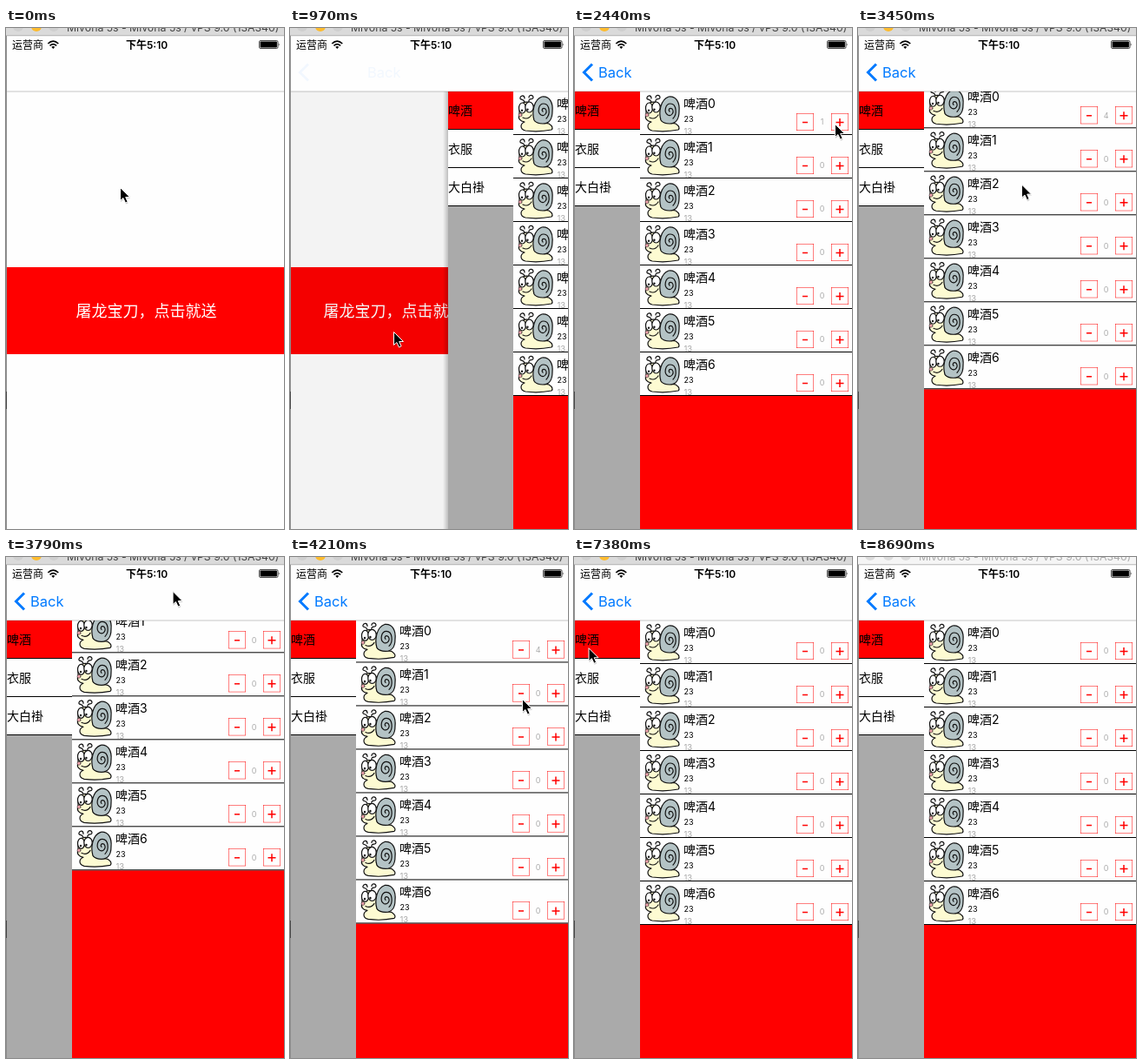
An HTML page that plays this animation: 320 px wide and 576 px high, repeating every 8.74 s.

```html
<!DOCTYPE html>
<html lang="zh-CN">
<head>
<meta charset="utf-8">
<title>Order list</title>
<style>
html, body { margin: 0; width: 100%; height: 100%; overflow: hidden; background: #fff; }
svg { display: block; width: 320px; height: 576px; }
text { font-family: Inter, "Noto Sans CJK SC", "Noto Sans CJK", sans-serif; white-space: pre; }
</style>
</head>
<body>
<svg viewBox="0 0 320 576" xmlns="http://www.w3.org/2000/svg">
  <defs>
    <linearGradient id="edge">
      <stop offset="0" stop-color="#000" stop-opacity="0"/>
      <stop offset="1" stop-color="#000" stop-opacity=".22"/>
    </linearGradient>
    <g id="snail" stroke="#111" stroke-width="1.2" stroke-linejoin="round" stroke-linecap="round">
      <path d="M9 8C8 4 3 6 4 3S9 0 9 4M14 8C13 3 19 6 19 3S14 -1 14 3" fill="none"/>
      <path d="M3 14C5 7 16 6 19 12C21 18 18 25 21 30C25 33 33 32 37 33Q43 37 40 40Q25 43 10 41C3 39 4 33 9 31C4 30 1 27 3 23Z" fill="#fdfbd2"/>
      <path d="M20 29C17 19 20 5 29 2C38 1 42 9 41 19C41 29 36 33 30 33Q23 33 20 29Z" fill="#b4c3c5"/>
      <path d="M30 19C28 17 30 14 33 16C36 20 32 25 28 23C23 20 25 10 31 10C38 10 39 22 34 27" fill="none"/>
      <ellipse cx="6.5" cy="15" rx="4" ry="6" fill="#fff"/>
      <ellipse cx="14.5" cy="14" rx="4.7" ry="6" fill="#fff"/>
      <path d="M6 17.5v.5M12.5 16.5v.5" stroke-width="2.2"/>
      <path d="M7 26Q13 29 17 23" fill="none"/>
      <circle cx="4" cy="23" r="2" fill="#f3a6b0" stroke-width=".5"/>
    </g>
  </defs>

  <rect width="320" height="576" fill="#fefefe"/>
  <g id="home">
    <rect x="1" y="275" width="420" height="100" fill="#f00"/>
    <text x="80.5" y="332" font-size="18" font-weight="300" fill="#fff">屠龙宝刀，点击就送</text>
  </g>
  <rect id="dim" y="73" width="320" height="503"/>

  <g id="page">
    <rect x="-5" y="73" width="6" height="503" fill="url(#edge)"/>
    <rect x="1" y="73" width="75" height="503" fill="#aaa"/>
    <g id="cats"></g>
    <rect x="76" y="73" width="245" height="503" fill="#f00"/>
    <g id="list"></g>
  </g>

  <rect x="1" y="9" width="319" height="64" fill="#fefefe"/>
  <rect x="1" y="72.5" width="319" height="1" opacity=".22"/>
  <g id="nav" fill="#007aff">
    <path d="M21 41.5L11.5 51L21 60.5" fill="none" stroke="#007aff" stroke-width="3"/>
    <text id="back" y="57" font-size="16.5">Back</text>
  </g>

  <text x="7" y="23.5" font-size="12">运营商</text>
  <path d="M48.3 18Q54.3 12.4 60.3 18M50.5 20.4Q54.3 17 58.1 20.4" fill="none" stroke="#000" stroke-width="1.7"/>
  <path d="M52.3 21.8Q54.3 20 56.3 21.8L54.3 24Z"/>
  <text x="138" y="23.5" font-size="12" font-weight="600">下午5:10</text>
  <rect x="291.5" y="14.5" width="21.5" height="9" rx="1.5" fill="none" stroke="#000" stroke-width=".7"/>
  <rect x="292.6" y="15.6" width="19.3" height="6.8" rx=".6"/>
  <path d="M313.8 17.2q1.6 1.8 0 3.6z"/>

  <rect id="bar" width="320" height="9"/>
  <rect y="8.4" width="320" height=".8" fill="#aaa"/>
  <g id="lights">
    <circle cx="14" cy="-2" r="6"/><circle cx="35" cy="-2" r="6"/><circle cx="55" cy="-2" r="6"/>
  </g>
  <text id="title" x="70" y="3.5" font-size="12.3">Mivona 5s - Mivona 5s / vPS 9.0 (13A340)</text>
  <rect y="9" width="1" height="567" fill="#8c8c8c"/>
  <rect y="418" width="1" height="20" fill="#444"/>

  <g id="cursor">
    <path d="M1 2V17L4.4 14L7 19.6L9.6 18.4L7.2 13H12Z" opacity=".2"/>
    <path d="M.5 .5V15.5L3.9 12.5L6.5 18.1L9.1 16.9L6.7 11.5H11.5Z" stroke="#fff"/>
  </g>
</svg>

<script>
const LOOP = 8740, TOP = 73, CELL = 44, ROW = 50, ROWS = 7;
const CATS = ['啤酒', '衣服', '大白褂'];

const $ = id => document.getElementById(id);
const clamp = v => Math.max(0, Math.min(1, v));
const smooth = k => k * k * (3 - 2 * k);
const easeOut = k => 1 - (1 - k) ** 2;
const spring = x => (1 + x) * Math.exp(-x);
const move = (el, x, y) => el.setAttribute('transform', `translate(${x} ${y})`);
const paint = (el, color) => el.setAttribute('fill', color);

// Places the pointer visits
const plus = [300, 110], minus = [265, 111];
const cat = i => [15, TOP + 28 + CELL * i];

// Pointer strokes: start, end, destination
const MOVES = [
  [50, 330, [98, 290]], [330, 620, [119, 349]],
  [980, 1320, [223, 184]], [1320, 2020, plus],
  [2830, 3210, [191, 239]], [3410, 3690, [180, 20]],
  [3760, 4210, [267, 163]], [4380, 4600, minus],
  [5690, 6080, cat(1)], [6770, 6900, cat(2)], [6930, 7140, cat(0)],
  [7380, 7620, [200, 487]], [7770, 7970, [302, 541]], [8100, 8250, [304, 578]]
];

function pointAt(t) {
  let [x, y] = [131, 183];
  for (const [from, to, [tx, ty]] of MOVES) {
    const k = easeOut(clamp((t - from) / (to - from)));
    x += (tx - x) * k;
    y += (ty - y) * k;
  }
  return [x, y];
}

// Four taps in a row
const taps = (t, from) => Math.max(0, Math.min(4, 1 + Math.floor((t - from) / 130)));

function pickAt(t) {
  if (t < 6320 || t >= 7380) return 0;
  return t < 6900 ? 1 : 2;
}

// Drag up past the end, then bounce back
function scrollAt(t) {
  if (t >= 4600) return 0;
  return 72 * (t < 3740 ? smooth(clamp((t - 3392) / 290)) : spring((t - 3740) * .0122));
}

$('cats').innerHTML = CATS.map((name, i) => `<g transform="translate(1 ${TOP + CELL * i})">
  <rect class="cat" width="75" height="${CELL}"/><rect y="${CELL - 1}" width="75" height="1"/>
  <text y="27" font-size="14">${name}</text></g>`).join('');

const button = (x, sign) => `<rect x="${x + .25}" y="25.25" width="19.5" height="19.5" fill="none" stroke="#f00" stroke-width=".5"/>
  <path d="${sign}" transform="translate(${x + 10} 35.5)" stroke="#f00" stroke-width="1.5"/>`;

const row = i => `<g transform="translate(0 ${TOP + ROW * i})">
  <use href="#snail" x="80" y="4"/>
  <text class="name" x="126" y="19" font-size="14"></text>
  <text x="126.5" y="34.5" font-size="9">23</text>
  <text x="126.5" y="48.5" font-size="9.5" fill="#aaa">13</text>
  ${button(256, 'M-3 0H3')}${button(296, 'M-4.5 0H4.5M0 -4.5V4.5')}
  <text class="count" x="285.7" y="38.3" font-size="9" fill="#aaa" text-anchor="middle">0</text>
  <rect x="76" y="${ROW - 1}" width="245" height="1"/></g>`;

$('list').innerHTML = `<rect x="76" y="${TOP}" width="245" height="${ROW * ROWS}" fill="#fefefe"/>`
  + Array.from({ length: ROWS }, (_, i) => row(i)).join('');

const cats = document.querySelectorAll('.cat');
const names = document.querySelectorAll('.name');
const count = document.querySelector('.count');
const lights = [...$('lights').children];

function draw(t) {
  const pushed = t >= 920;
  const away = pushed ? spring((t - 891) * .0184) : 1;
  const shown = 1 - away;
  move($('home'), -Math.round(96 * shown), 0);
  $('dim').setAttribute('opacity', .1 * shown);
  move($('page'), Math.round(319 * away), 0);
  $('page').setAttribute('visibility', pushed ? 'visible' : 'hidden');
  $('nav').setAttribute('opacity', clamp((shown - .41) * 2));
  $('back').setAttribute('x', 28 + Math.round(108 * away));

  const pick = pickAt(t);
  move($('list'), 0, -scrollAt(t));
  cats.forEach((c, i) => paint(c, i === pick ? '#f00' : '#fefefe'));
  names.forEach((n, i) => n.textContent = CATS[pick] + i);
  count.textContent = taps(t, 2440) - taps(t, 4900);

  const active = t < 8690;
  paint($('bar'), active ? '#dadada' : '#f5f5f5');
  paint($('title'), active ? '#444' : '#aaa');
  lights.forEach((l, i) => paint(l, !active ? '#dcdcdc' : i === 1 ? '#fdbc2f' : '#cfcfcf'));

  move($('cursor'), ...pointAt(t));
}

const start = performance.now();
function tick() {
  draw((performance.now() - start) % LOOP);
  requestAnimationFrame(tick);
}
tick();
</script>
</body>
</html>
```
